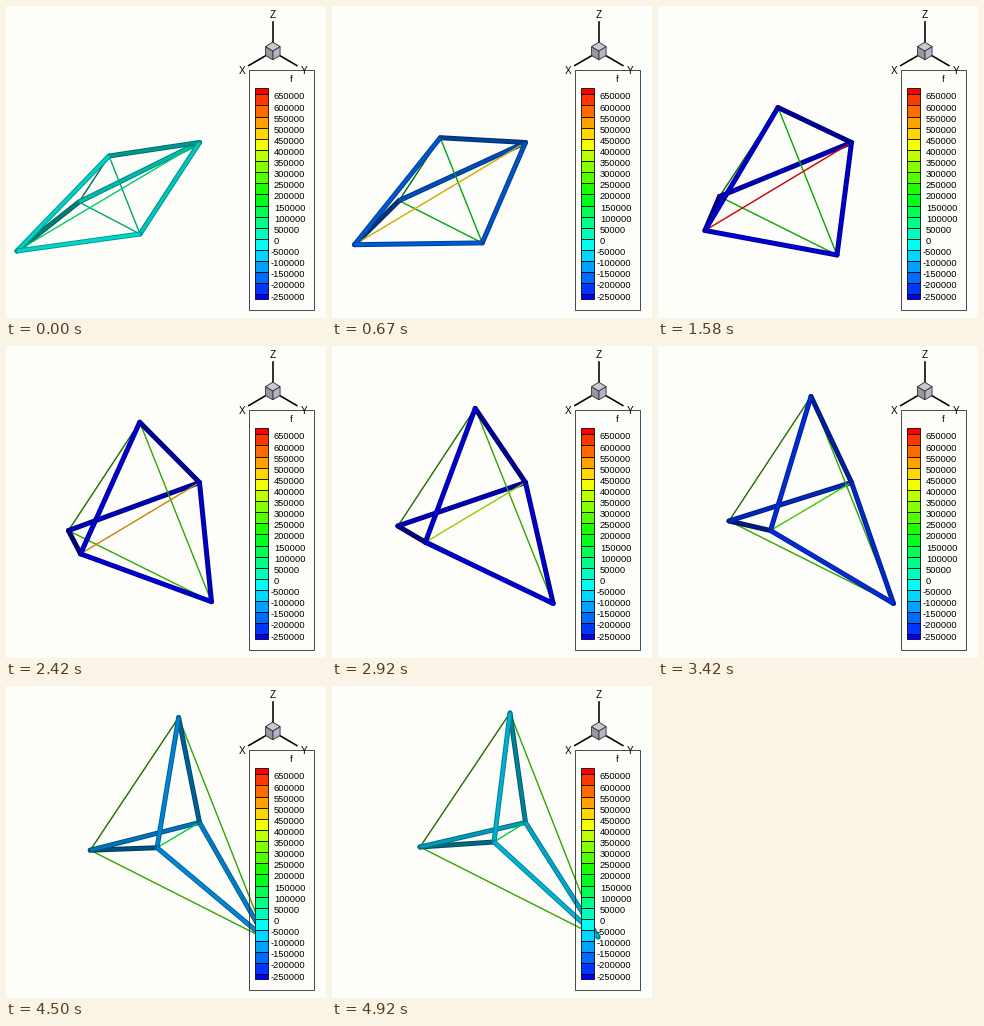
These frames come from a looping animation (320x312 px, 5.01 s). A matplotlib script:

```python
import numpy as np
import matplotlib.pyplot as plt
from matplotlib.animation import FuncAnimation
from matplotlib.patches import Polygon, Rectangle

W, H, DPI = 320, 312, 100
PX = 72 / DPI
FRAMES, INTERVAL = 167, 30
LAST = 49  # last solver step
BG = "#fdfdfa"


def ease(step):
    return (np.asarray(step) / LAST) ** 1.3


def path(*points):
    """Smooth curve through four key points."""
    fit = np.polyfit(ease([0, 16, 34, LAST]), points, 3)
    return lambda step: ease(step) ** np.arange(3, -1, -1) @ fit


NODES = {
    "A": path((103, 150), (120, 101.5), (153, 50.5), (178, 27)),
    "B": lambda step: (193.5, 136.5),
    "C": path((134, 228), (179, 249), (235.5, 257.5), (266, 251)),
    "D": path((11, 245), (47, 224.5), (112.5, 184.5), (162, 156)),
    "E": path((73, 196), (61.5, 190.5), (71, 175), (88, 161)),
}


def pulse(step, peak, power):
    x = step / peak
    return (x * np.exp(1 - x)) ** power


# Axial force of each member group, in thousands
FORCE = {
    "strut": lambda s: -20 - 305 * pulse(s, 18.5, 2),
    "cable": lambda s: 40 + 240 * (1 - np.exp(-s / 11)),
    "diagonal": lambda s: 60 + 615 * pulse(s, 14.5, 2.15),
}

# Members from back to front: ends, group, brightness
MEMBERS = [
    ("AE", "cable", 0.42), ("EC", "cable", 0.65), ("DE", "strut", 0.5),
    ("EB", "strut", 0.72), ("AC", "cable", 0.65), ("DB", "diagonal", 0.8),
    ("AB", "strut", 0.6), ("CB", "strut", 0.78), ("AD", "strut", 0.82),
    ("DC", "strut", 0.84),
]


def rainbow(t):
    """Blue, cyan, green, yellow, red."""
    return np.clip([4 * t - 2, 2 - abs(4 * t - 2), 2 - 4 * t], 0, 1)


def band_color(force):
    band = np.clip(np.floor((force + 250) / 50) + 1, 0, 19)
    return rainbow(band / 19)


fig = plt.figure(figsize=(W / DPI, H / DPI), dpi=DPI, facecolor=BG)
ax = fig.add_axes([0, 0, 1, 1])
ax.set(xlim=(0, W), ylim=(H, 0))
ax.axis("off")


def label(x, y, s, size, ha="center"):
    ax.text(x, y, s, fontsize=size * PX, family="Liberation Sans", ha=ha,
            va="center_baseline", color="black", zorder=12)


def stroke(xs, ys, width, **kw):
    return ax.plot(xs, ys, lw=width * PX, **kw)[0]


def draw_triad(x=266.8, y=45):
    for name, dx, dy in (("X", -1, 0.5), ("Y", 1, 0.5), ("Z", 0, -1)):
        stroke([x + 6 * dx, x + 24 * dx], [y + 8 * dy, y + 29 * dy], 1.6,
               color="black", zorder=8)
        label(x + 31 * dx, y + 37.5 * dy, name, 10)
    # Isometric cube: three faces, each a third of a hexagon
    turn = np.radians(60 * np.arange(7) - 90)
    rim = np.column_stack([x + 8.4 * np.cos(turn), y + 8.8 * np.sin(turn)])
    for i, color in enumerate(("#b4b4cc", "#98989c", "#cacad2")):
        pts = [(x, y), *rim[2 * i + 1:2 * i + 4], ] if i < 2 else \
              [(x, y), rim[5], rim[0], rim[1]]
        ax.add_patch(Polygon(pts, fc=color, ec="#383838", lw=0.9 * PX, zorder=9))


def draw_legend():
    ax.add_patch(Rectangle((243, 64), 64.5, 239.5, fc="none", ec="#202028",
                           lw=0.8 * PX, zorder=9))
    label(285, 73, "f", 9.5)
    top, bottom, pitch = 82, 293, 11.12
    edges = [top, *(88.3 + pitch * np.arange(19)), bottom]
    for i, (y0, y1) in enumerate(zip(edges, edges[1:])):
        ax.add_patch(Rectangle((249, y0), 13, y1 - y0, fc=rainbow(1 - i / 19),
                               ec="black", lw=0.8 * PX, zorder=10))
    for i in range(19):
        value = 650000 - 50000 * i
        label(265 if value < 0 else 267.8, 89.9 + pitch * i, str(value), 9.4, "left")


draw_triad()
draw_legend()

lines = []
for z, (_, group, _) in enumerate(MEMBERS):
    if group == "strut":
        tube = (stroke([], [], 5, zorder=1 + z / 2, solid_capstyle="round"),
                stroke([], [], 3, zorder=1.2 + z / 2, solid_capstyle="butt"))
    else:
        tube = (stroke([], [], 1.4, zorder=1 + z / 2),)
    lines.append(tube)


def update(frame):
    # Twelve ticks a second; every sixth one holds the pose
    tick = min(int((frame * INTERVAL + 25) * 12 / 1000), 59)
    step = tick - (tick + 3) // 6
    for (ends, group, shade), tube in zip(MEMBERS, lines):
        color = band_color(FORCE[group](step)) * shade
        xs, ys = zip(*(NODES[n](step) for n in ends))
        for line, dim in zip(tube[::-1], (1, 0.72)):
            line.set_data(xs, ys)
            line.set_color(color * dim)
    return [line for tube in lines for line in tube]


anim = FuncAnimation(fig, update, frames=FRAMES, interval=INTERVAL,
                     repeat=True, repeat_delay=0, blit=False)
plt.show()
```
